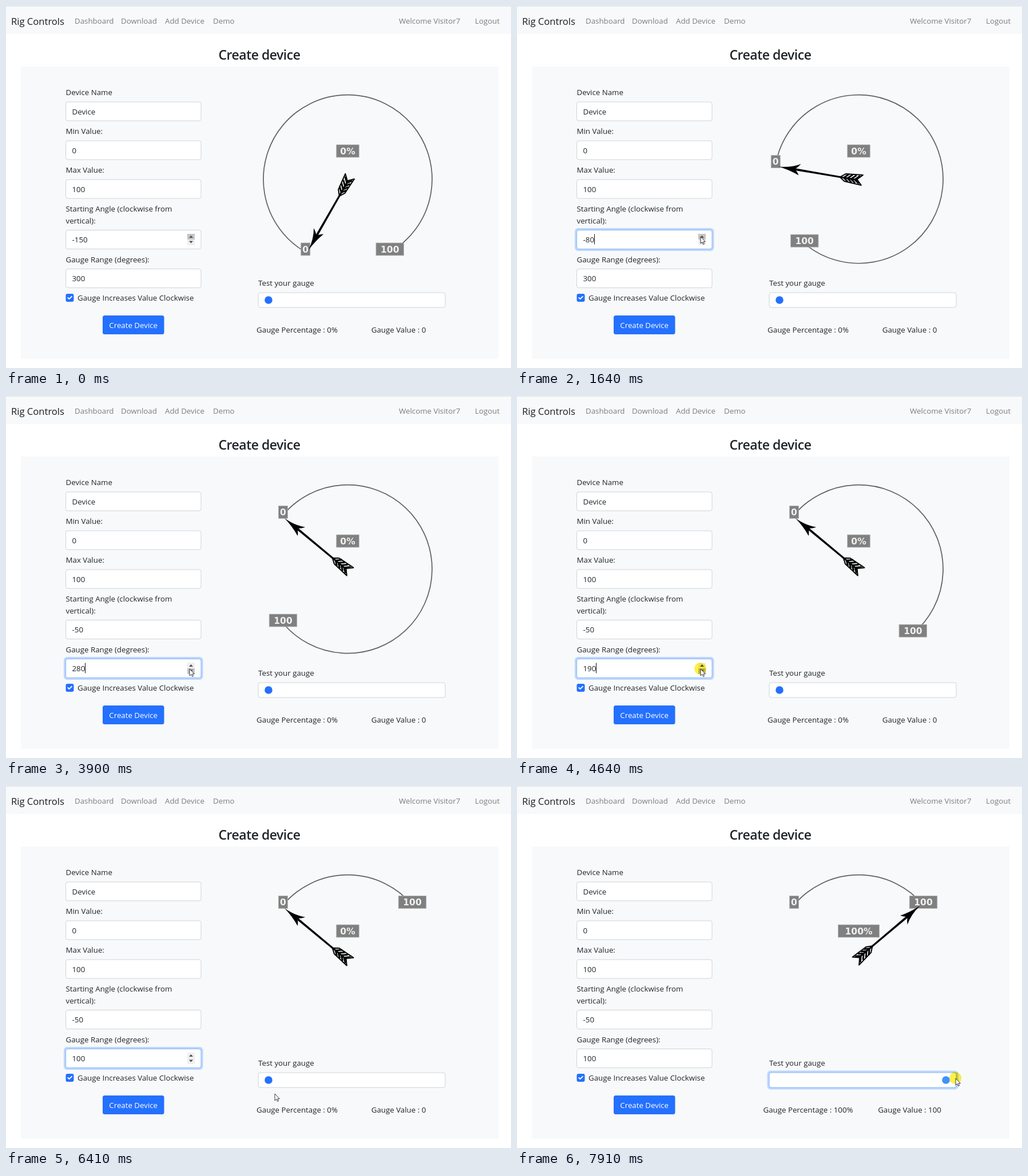
Recreate the animation shown at these times as an HTML page. Size 883 by 634 pixels, loop 8000 ms.

```html
<!DOCTYPE html>
<html lang="en">
<head>
<meta charset="utf-8">
<title>Create device</title>
<style>
  html, body { margin: 0; width: 100%; height: 100%; overflow: hidden; background: #fff; }
  svg { display: block; width: 883px; height: 634px; }
  text { font: 13.3px "Open Sans", "Noto Sans", sans-serif; fill: #212529; }
  .nav { fill: #7c7d7e; }
  .brand { font-size: 16.6px; fill: #1b1c1d; }
  .title { font-size: 23px; font-weight: 600; letter-spacing: -.5px; }
  .tag { font: bold 15.5px "DejaVu Sans", sans-serif; fill: #f0f0f0; }
  .mid { text-anchor: middle; }
  .field { fill: #fff; stroke: #ced4da; }
  .field.on { stroke: #86b7fe; }
  .ring { fill: #bcd6fd; }
  .glow { fill: #fff04a; mix-blend-mode: multiply; }
</style>
</head>
<body>
<svg id="stage" viewBox="0 0 883 634" xmlns="http://www.w3.org/2000/svg"></svg>
<script>
const LOOP = 8000, TICK = 125.4;
const CX = 597.5, CY = 303.2, R = 147.5;
const BLUE = '#2470ff';
const stage = document.getElementById('stage');

function set(el, attrs) {
  for (const k in attrs) el.setAttribute(k, attrs[k]);
}
function add(tag, attrs, parent = stage) {
  const el = document.createElementNS('http://www.w3.org/2000/svg', tag);
  set(el, attrs);
  return parent.appendChild(el);
}
function show(el, on) { el.setAttribute('visibility', on ? 'visible' : 'hidden'); }
function write(x, y, str, cls = '', parent = stage) {
  const el = add('text', { x, y, class: cls }, parent);
  el.textContent = str;
  return el;
}
function box(x, y, width, height, attrs, parent = stage) {
  return add('rect', { x, y, width, height, ...attrs }, parent);
}

// Page frame
box(0, 0, 883, 49, { fill: '#f8f9fa' });
box(0, 0, 883, 1, { fill: '#e4e6e8' });
box(26, 106, 835, 512, { fill: '#f8f9fa' });
write(9, 32.5, 'Rig Controls', 'brand');
write(120, 31, 'Dashboard', 'nav');
write(201, 31, 'Download', 'nav');
write(278, 31, 'Add Device', 'nav');
write(362, 31, 'Demo', 'nav');
write(687, 31, 'Welcome Visitor7', 'nav');
write(820, 31, 'Logout', 'nav');
write(443, 94, 'Create device', 'title mid');

// Form
function makeField(x, y, w, h, value) {
  const ring = box(x - 3.5, y - 3.5, w + 7, h + 7, { rx: 6, class: 'ring' });
  const frame = box(x, y, w, h, { rx: 3.5, class: 'field' });
  return { ring, frame, y, label: write(x + 11, y + 21.5, value) };
}
function focus(field, on) {
  show(field.ring, on);
  field.frame.setAttribute('class', on ? 'field on' : 'field');
}
function makeSpinner(y) {
  const g = add('g', {});
  box(317, y, 13, 20, { fill: '#efefef' }, g);
  const hover = box(317, y, 13, 10, { fill: '#c4c4c4' }, g);
  add('path', { d: `M320 ${y + 7}l3.5 -4l3.5 4zM320 ${y + 12.5}l3.5 4l3.5 -4z`, fill: '#505050' }, g);
  return { g, hover, y };
}
function makeInput(y, caption, value) {
  caption.forEach((line, i) => write(104.5, y - 12 - 21 * (caption.length - 1 - i), line));
  const field = makeField(104.5, y, 236.5, 33, value);
  focus(field, false);
  return field;
}
makeInput(168, ['Device Name'], 'Device');
makeInput(236, ['Min Value:'], '0');
makeInput(304, ['Max Value:'], '100');
const angleField = makeInput(392.5, ['Starting Angle (clockwise from', 'vertical):'], '');
const rangeField = makeInput(460.5, ['Gauge Range (degrees):'], '');
const angleSpin = makeSpinner(399), rangeSpin = makeSpinner(467);
const caret = box(0, 0, 1, 18, { fill: '#111' });

box(104.5, 504, 14, 14, { rx: 3, fill: BLUE });
add('path', {
  d: 'M108.3 511l2.2 2.2l4.3 -4.4', fill: 'none', stroke: '#fff',
  'stroke-width': 1.9, 'stroke-linecap': 'round', 'stroke-linejoin': 'round'
});
write(125, 516, 'Gauge Increases Value Clockwise');
box(169, 542, 107.5, 33, { rx: 3.5, fill: BLUE });
write(222.7, 564, 'Create Device', 'mid').style.fill = '#fff';

// Slider and readouts
write(441, 490, 'Test your gauge');
const slider = makeField(441, 502, 327, 26, '');
const thumb = add('circle', { cy: 515, r: 6.8 });
const pctText = write(509, 572, '', 'mid');
const valText = write(686.5, 572, '', 'mid');

// Gauge
const arc = add('path', { fill: 'none', stroke: '#606060', 'stroke-width': 1.7 });
function makeTag(str) {
  const g = add('g', {});
  const rect = box(0, -11, 0, 22, { fill: '#808080', stroke: '#b4b4b4', 'stroke-width': .8 }, g);
  const tag = { g, rect, label: write(0, 5.7, str, 'tag mid', g) };
  fitTag(tag);
  return tag;
}
function fitTag({ rect, label }) {
  const width = label.textContent.length < 2 ? 16 : label.getComputedTextLength() * 1.5;
  set(rect, { x: -width / 2, width });
}
function placeTag(tag, [x, y]) {
  tag.g.setAttribute('transform', `translate(${x} ${y - 5})`);
}
const minTag = makeTag('0'), maxTag = makeTag('100'), pctTag = makeTag('0%');
placeTag(pctTag, [CX, 259]);

const arrow = add('g', {});
add('path', { d: 'M-4.3 -115H-.5V-4H-3.4Z' }, arrow);
add('path', { d: 'M-2.7 -142Q-1 -120 8.5 -104Q2 -108 -2 -113Q-6 -108 -11.7 -104.5Q-5 -122 -2.7 -142Z' }, arrow);
add('path', {
  d: 'M-2.2 -33L5 -24L8.3 6L-1 -3L-9.8 6L-8 -24Z', fill: '#f8f9fa',
  stroke: '#000', 'stroke-width': 2, 'stroke-linejoin': 'round'
}, arrow);
for (let y = -26; y < 0; y += 6.5) {
  add('path', { d: `M-8 ${y + 8}L-2 ${y}L6 ${y + 8}`, fill: 'none', stroke: '#000', 'stroke-width': 3 }, arrow);
}
add('path', { d: 'M-2 -32V-2', stroke: '#000', 'stroke-width': 3 }, arrow);

// Pointer
const glow = add('circle', { r: 10.5, class: 'glow' });
const pointer = add('path', {
  d: 'M0 0V12L2.8 9.4L4.6 13.4L6.5 12.6L4.8 8.8H8.4Z',
  fill: '#fff', stroke: '#222', 'stroke-width': .9, 'stroke-linejoin': 'round'
});

// Motion, all in whole ticks
const RATE = .575;            // angle steps per tick
const ANGLE = 1, RANGE = 29, SLIDER = 55;   // focus times
const path = [[0, 321, 404], [21, 321, 404], [27, 321, 478], [47, 321, 478],
  [49, 483, 537], [51, 470, 539], [SLIDER, 465, 512]];

const clamp = (v, lo, hi) => Math.min(hi, Math.max(lo, v));
const within = (n, a, b) => n >= a && n < b;
function smooth(a, b, n) {
  const u = clamp((n - a) / (b - a), 0, 1);
  return u * u * (3 - 2 * u);
}
function along(points, n) {
  const i = points.findIndex(p => p[0] > n);
  if (i < 0) return points[points.length - 1].slice(1);
  const [t0, x0, y0] = points[i - 1], [t1, x1, y1] = points[i];
  const u = (n - t0) / (t1 - t0);
  return [x0 + (x1 - x0) * u, y0 + (y1 - y0) * u];
}
function isDown(n) {
  if (n < 20) return n >= ANGLE && n * RATE % 1 < .44;
  return n === RANGE || within(n, 34, 39) || within(n, 42, 47) || n > SLIDER;
}
function polar(deg) {
  const a = deg * Math.PI / 180;
  return [CX + R * Math.sin(a), CY - R * Math.cos(a)];
}
function updateSpinner(spin, focused, x, y) {
  const over = within(x, 317, 330) && within(y, spin.y, spin.y + 20);
  show(spin.g, focused || over);
  set(spin.hover, { y: y < spin.y + 10 ? spin.y : spin.y + 10, opacity: over ? 1 : 0 });
}

function render(t) {
  const n = Math.floor((t + 8) / TICK);
  const angle = -150 + 10 * Math.min(10, Math.floor(n * RATE));
  const range = n < 47 ? 10 * Math.round(30 - 21.2 * smooth(28, 46, n)) : 100;
  const pct = Math.round(100 * smooth(56.3, 63, n));
  const active = n < ANGLE ? null : n < RANGE ? angleField : n < SLIDER ? rangeField : slider;
  const down = isDown(n);
  const [px, y] = along(path, n);
  const x = px + 3.02 * pct;

  angleField.label.textContent = angle;
  rangeField.label.textContent = range;
  [angleField, rangeField, slider].forEach(f => focus(f, f === active));
  updateSpinner(angleSpin, active === angleField, x, y);
  updateSpinner(rangeSpin, active === rangeField, x, y);

  // The caret stays on while stepping and blinks afterwards
  const typing = active && active !== slider;
  const idle = n - (n < RANGE ? 20 : 47);
  show(caret, typing && (idle < 0 || idle % 8 < 4));
  if (typing) set(caret, { x: Math.round(115.5 + active.label.getComputedTextLength()), y: active.y + 7 });

  const from = polar(angle), to = polar(angle + range);
  arc.setAttribute('d', `M${from}A${R} ${R} 0 ${range > 180 ? 1 : 0} 1 ${to}`);
  placeTag(minTag, from);
  placeTag(maxTag, to);
  arrow.setAttribute('transform', `translate(${CX} ${CY}) rotate(${angle + range * pct / 100})`);

  pctTag.label.textContent = pct + '%';
  fitTag(pctTag);
  pctText.textContent = `Gauge Percentage : ${pct}%`;
  valText.textContent = `Gauge Value : ${pct}`;
  set(thumb, { cx: 459 + 2.91 * pct, fill: active === slider && down ? '#3f92fb' : BLUE });

  set(pointer, { transform: `translate(${x} ${y})` });
  set(glow, { cx: x - .5, cy: y - .5 });
  show(pointer, n >= ANGLE);
  show(glow, down);
}

const start = performance.now();
function frame() {
  render((performance.now() - start) % LOOP);
  requestAnimationFrame(frame);
}
frame();
</script>
</body>
</html>
```
